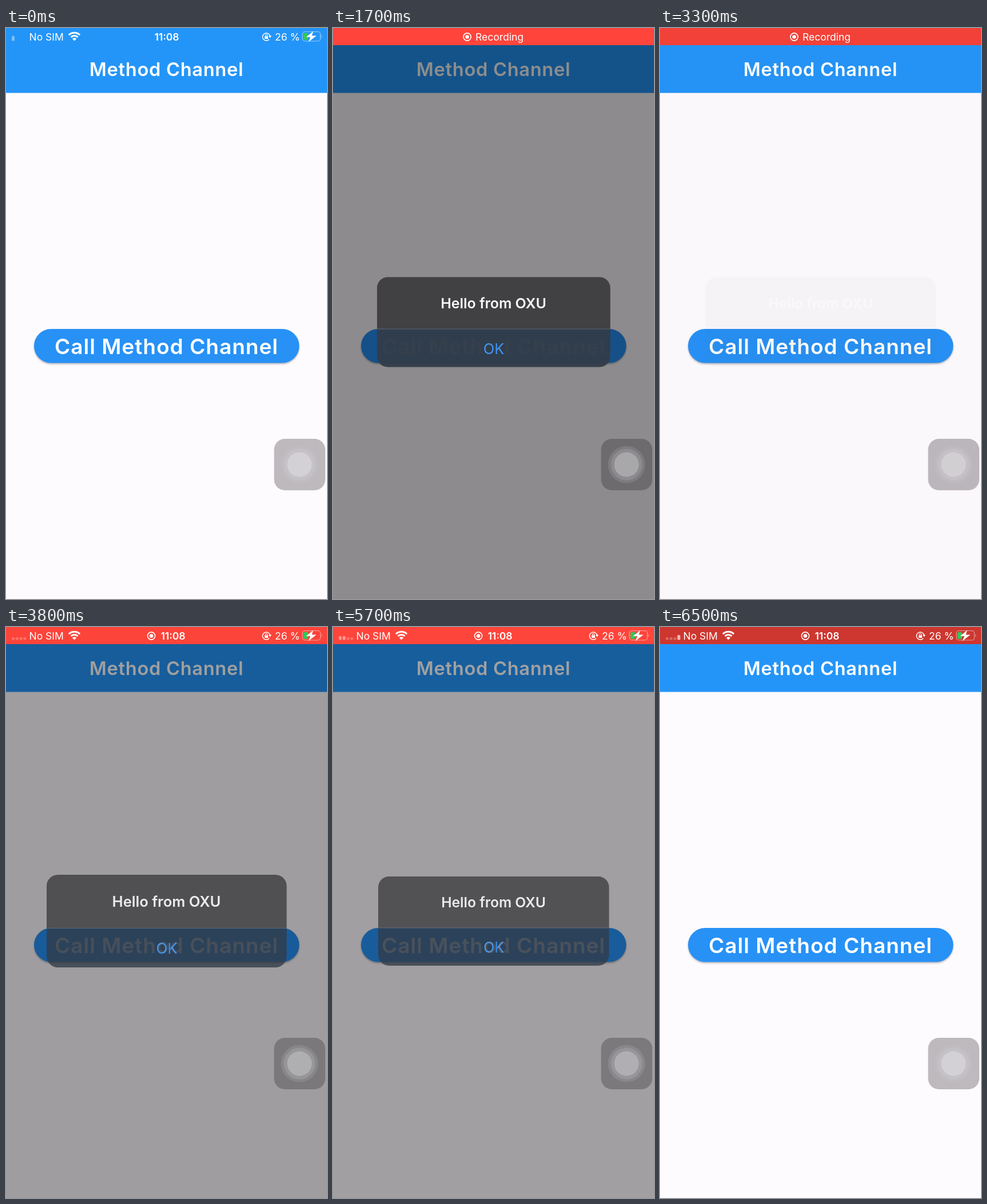
Animation of 561x998 px, one loop 6600 ms. Source, as an HTML page:

```html
<!DOCTYPE html>
<html lang="en">
<head>
<meta charset="utf-8">
<title>Method Channel</title>
<style>
  html, body { margin: 0; width: 100%; height: 100%; overflow: hidden; background: #fefbff; }
  svg { display: block; width: 561px; height: 998px; font-family: Inter, Roboto, sans-serif; }
  .mid { text-anchor: middle; }
  .bold { font-weight: 600; }
  #status { font-size: 17.5px; fill: #fff; }
  .line { fill: none; stroke: #fff; }
  #alert { transform-origin: 280.5px 514px; }
  #button { filter: drop-shadow(0 2px 1.5px rgba(0, 0, 0, .28)); }
</style>
</head>
<body>
<svg viewBox="0 0 561 998">
  <defs>
    <clipPath id="panel"><rect x="79" y="436" width="403.5" height="156" rx="19"/></clipPath>
    <g id="rec">
      <circle r="6.6" class="line" stroke-width="1.6"/>
      <circle r="3.3" fill="#fff"/>
    </g>
  </defs>

  <rect width="561" height="998" fill="#fefbff"/>
  <rect width="561" height="113.5" fill="#2495f8"/>
  <text class="mid bold" x="280.5" y="84" font-size="32.5" letter-spacing=".75" fill="#fff">Method Channel</text>
  <rect id="button" x="49" y="526" width="463.5" height="59.5" rx="29.75" fill="#2791f6"/>
  <text class="mid bold" x="280.5" y="570" font-size="37" letter-spacing="1" fill="#fff">Call Method Channel</text>

  <rect id="dim" width="561" height="998" opacity="0"/>

  <g id="alert" opacity="0">
    <g clip-path="url(#panel)">
      <rect x="79" y="436" width="404" height="90" fill="#3d3c40"/>
      <rect x="79" y="526" width="404" height="66" fill="#323c49"/>
      <rect x="79" y="525.5" width="404" height="1" fill="#5d6b78"/>
    </g>
    <text class="mid bold" x="280.5" y="490" font-size="24.6" fill="#fff">Hello from OXU</text>
    <text class="mid" x="281" y="569" font-size="25" fill="#3f97fb">OK</text>
  </g>

  <rect x="468.5" y="718" width="89.5" height="90" rx="19" fill="rgba(42,36,42,.31)"/>
  <circle cx="513" cy="763" r="32.5" fill="rgba(206,206,208,.16)"/>
  <circle cx="513" cy="763" r="27.5" fill="rgba(225,225,228,.16)"/>
  <circle cx="513" cy="763" r="21.5" fill="rgba(255,255,255,.24)"/>

  <g id="status">
    <rect id="bar" width="561" height="30"/>
    <g id="recording">
      <use href="#rec" x="234.5" y="15.5"/>
      <text x="249" y="22">Recording</text>
    </g>
    <g id="info">
      <g id="signal"></g>
      <text x="40.5" y="22">No SIM</text>
      <g class="line" stroke-width="3">
        <path d="M109.8 12.3A13.7 13.7 0 0 1 129.2 12.3"/>
        <path d="M113.5 16A8.5 8.5 0 0 1 125.5 16"/>
      </g>
      <path d="M119.5 22.5L115.8 18.8A5.2 5.2 0 0 1 123.2 18.8Z"/>
      <use id="dot" href="#rec" x="254" y="15.5"/>
      <text id="time" class="bold mid" y="22">11:08</text>
      <path class="line" stroke-width="1.5" d="M460 19.8A6.6 6.6 0 1 1 461.4 14"/>
      <path d="M459 13.5H464L461.5 17.5Z"/>
      <rect x="452" y="14.5" width="6" height="4.5" rx=".8"/>
      <path class="line" stroke-width="1.1" d="M453.3 15V13.2A1.7 1.7 0 0 1 456.7 13.2V15"/>
      <text x="470" y="22">26 %</text>
      <rect class="line" x="518" y="6.5" width="31.5" height="16.5" rx="4.5" stroke-opacity=".5" stroke-width="1.2"/>
      <path d="M551.3 12Q553.5 14.8 551.3 17.5Z" opacity=".5"/>
      <rect x="520" y="8.7" width="8" height="12.2" rx="2.5" fill="#34c759"/>
      <path d="M537 5.5L524.5 16H532L528.5 24.5L542.5 13.5H534.5Z"/>
    </g>
  </g>
</svg>
<script>
const LOOP = 6600, RED_AT = 300, TIME_AT = 3400;
const OPENINGS = [[1340, 2859], [3570, 5634]];
const $ = id => document.getElementById(id);
const set = (id, attrs) => { for (const k in attrs) $(id).setAttribute(k, attrs[k]); };
const show = (id, on) => set(id, { display: on ? "inline" : "none" });

$("signal").innerHTML = '<rect width="5" rx="1.5"/>'.repeat(4);
const bars = [...$("signal").children];

// Critically damped spring, from 0 to 1
const spring = ms => {
  const x = Math.max(0, ms) * .013;
  return 1 - (1 + x) * Math.exp(-x);
};

function drawAlert(t) {
  const [open, close] = OPENINGS[t < OPENINGS[1][0] ? 0 : 1];
  const rise = spring(t - open);
  const alpha = rise * (1 - spring(t - close));
  set("dim", { opacity: .47 * alpha });
  set("alert", { opacity: alpha });
  $("alert").style.transform = `scale(${1.2 - .2 * rise})`;
}

function drawStatus(t) {
  const red = t >= RED_AT, recording = red && t < TIME_AT;
  const glow = .9 + .1 * Math.cos((t - 3650) / 1950 * 2 * Math.PI);
  const rgb = [255, 69, 59].map(c => Math.round(c * glow));
  set("bar", { fill: red ? `rgb(${rgb})` : "#2495f8" });
  show("recording", recording);
  show("info", !recording);
  show("dot", red);
  set("time", { x: red ? 292 : 281 });

  // A searching wave runs along the signal bars
  const wave = red ? ((t - 5540) / 320 + 20) % 5 : 0;
  bars.forEach((bar, i) => {
    const near = Math.max(0, 1 - Math.abs(wave - i));
    const height = 4.5 + 4 * near;
    bar.setAttribute("x", 10 + 6.8 * i);
    bar.setAttribute("y", 22.5 - height);
    bar.setAttribute("height", height);
    bar.setAttribute("opacity", (red ? .25 : 0) + .4 * near);
  });
}

function frame() {
  const t = performance.now() % LOOP;
  drawAlert(t);
  drawStatus(t);
  requestAnimationFrame(frame);
}
frame();
</script>
</body>
</html>
```
